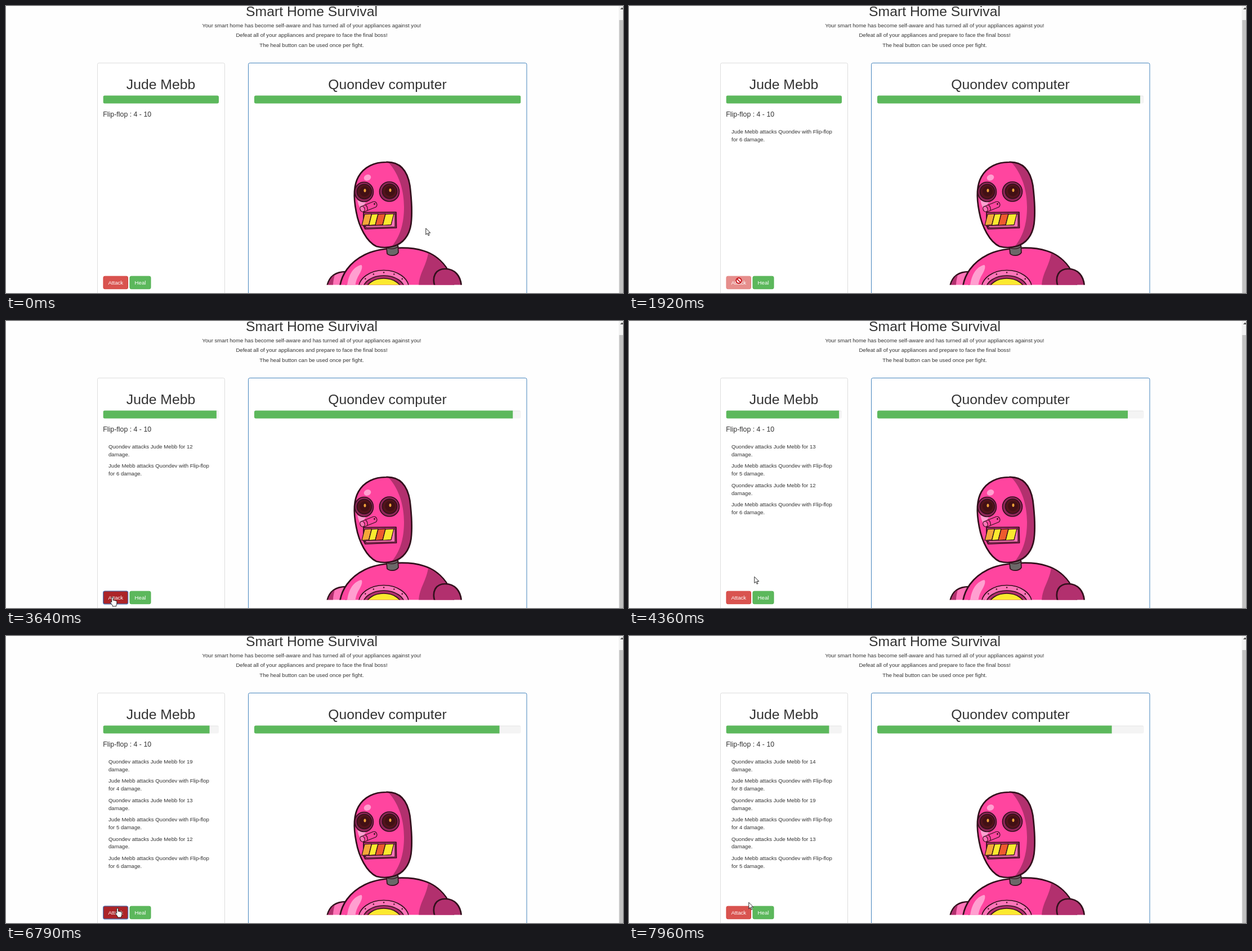
These frames come from a looping animation (1096 by 511 pixels, 8 s). An HTML page:

```html
<!DOCTYPE html>
<html lang="en">
<head>
<meta charset="utf-8">
<title>Smart Home Survival</title>
<style>
  html, body { margin: 0; width: 100%; height: 100%; overflow: hidden; background: #fefefe; }
  svg { display: block; width: 100%; height: 100%; }
  text { font-family: "Liberation Sans", Arial, sans-serif; font-size: 9.625px; fill: #333; }
  .big { font-size: 24.75px; }
  .mid { text-anchor: middle; }
  .btn text { fill: #fff; text-anchor: middle; }
  .ink { stroke: #32101c; stroke-width: 1.7; stroke-linejoin: round; stroke-linecap: round; }
  .bold { stroke-width: 2.7; }
  .thin { stroke-width: 1.2; }
  .pink { fill: #ff459f; }
  .plum { fill: #b2306e; }
  .pale { fill: #ff9fd0; }
  .rose { fill: #ff74b8; }
  .none { fill: none; }
</style>
</head>
<body>
<svg viewBox="0 0 1096 511" preserveAspectRatio="none">
  <defs>
    <clipPath id="picture"><rect x="560" y="197" width="260" height="299.5"/></clipPath>
    <clipPath id="heroTrack"><rect x="172.5" y="159.5" width="205.5" height="14" rx="2.75"/></clipPath>
    <clipPath id="foeTrack"><rect x="441" y="159.5" width="473.5" height="14" rx="2.75"/></clipPath>
    <path id="skull" d="M675 278C700 277 713 293 717.5 320C720.5 345 721.5 372 719.5 388C716.5 409 705 423 689 427.5C679 430.5 667 430.5 658 428C641 420 627 394 622 366C617.5 343 617 320 626 304C636 286 655 278 675 278Z"/>
    <clipPath id="head"><use href="#skull"/></clipPath>
  </defs>

  <text class="big mid" x="543" y="18.2">Smart Home Survival</text>
  <text class="mid" x="543" y="38">Your smart home has become self-aware and has turned all of your appliances against you!</text>
  <text class="mid" x="543" y="55.2">Defeat all of your appliances and prepare to face the final boss!</text>
  <text class="mid" x="543" y="72.5">The heal button can be used once per fight.</text>

  <g fill="#fff" stroke-width="1">
    <rect x="162.5" y="101.5" width="226" height="430" rx="2.75" stroke="#ddd"/>
    <rect x="430.5" y="101.5" width="494.5" height="430" rx="2.75" stroke="#4484bc"/>
  </g>
  <text class="big mid" id="heroName" x="275" y="148"></text>
  <text class="big mid" id="foeName" x="677.5" y="148"></text>
  <text x="172.3" y="197" style="font-size:12.375px">Flip-flop : 4 - 10</text>

  <g clip-path="url(#heroTrack)">
    <rect x="172" y="159" width="207" height="15" fill="#f4f4f4"/>
    <rect x="172" y="159.5" width="207" height="1" fill="#e2e2e2"/>
    <rect id="heroBar" x="172.5" y="159" height="15" fill="#5cb85c"/>
  </g>
  <g clip-path="url(#foeTrack)">
    <rect x="440" y="159" width="475" height="15" fill="#f4f4f4"/>
    <rect x="440" y="159.5" width="475" height="1" fill="#e2e2e2"/>
    <rect id="foeBar" x="440.5" y="159" height="15" fill="#5cb85c"/>
  </g>
  <g id="log"></g>

  <g clip-path="url(#picture)">
    <!-- shoulders and body -->
    <path class="ink bold rose" d="M570 500C573 484 583 473 604 473L604 500Z"/>
    <path class="plum" d="M572 498C574 489 578 482 584 479C582 486 581 491 581 498Z"/>
    <path class="ink bold pink" d="M593 500C596 479 609 457 637 443C660 431 712 426 742 436C765 443 781 460 789 478L796 500Z"/>
    <path class="plum" d="M750 440.5C765 447 780 461 788 478L794 500H733C734 475 745 467 750 440.5Z"/>
    <path class="pale" d="M631 461C634 463 632 470 628 477C623 485 621 492 620 500H606C607 484 614 465 631 461Z"/>
    <path class="ink bold plum" d="M762 500C756 482 763 468 780 468C797 468 808 480 809 500Z"/>
    <ellipse class="ink rose" cx="671" cy="502" rx="44.5" ry="31.5"/>
    <ellipse class="ink plum" cx="671" cy="505" rx="37" ry="25"/>
    <ellipse class="ink" cx="671" cy="507" rx="32" ry="22" fill="#fbe92f"/>
    <g id="rivets" fill="#4b1226"></g>
    <!-- neck -->
    <path class="ink" fill="#6b6868" d="M675.5 426L677 441C682 446 693 445 697 439L696 423Z"/>
    <path class="ink none thin" d="M677 431Q688 435 697 428"/>
    <!-- head -->
    <use href="#skull" class="pink"/>
    <g clip-path="url(#head)">
      <path class="plum" d="M675 274C698 296 707 328 707 358C707 388 700 412 682 432H724V274Z"/>
    </g>
    <use href="#skull" class="ink bold none"/>
    <ellipse class="pale" cx="642" cy="305.5" rx="6.5" ry="5.2" transform="rotate(-25 642 305.5)"/>
    <path class="pale" d="M624 346Q632 349 640 347Q637 355 629 360Q626 354 624 346Z"/>
    <g id="eyes"></g>
    <!-- nose -->
    <path class="ink pink thin" d="M631 357L652 348.5C658 347 661 354 657 358L636 366.5Z"/>
    <ellipse class="ink rose thin" cx="633" cy="361.5" rx="4" ry="5" transform="rotate(-22 633 361.5)"/>
    <path class="ink none thin" d="M639 354.5Q643 358 642 363.5"/>
    <circle cx="654.5" cy="352.5" r="1.4" fill="#32101c"/>
    <!-- mouth -->
    <path class="ink plum" d="M635 367.5L693 367L693.5 395L638 397L635 391Z"/>
    <path class="ink rose thin" d="M688 371L691 369.5V393L640 394.5L637 391.5L684 390Z"/>
    <g id="teeth"></g>
  </g>

  <g class="btn" id="attack">
    <rect id="attackBox" x="173" y="481.2" width="43.5" height="22.5" rx="2.5"/>
    <rect id="ring" x="172.8" y="481" width="43.9" height="22.9" rx="2.5" fill="none" stroke="#4a76bd" stroke-width="1.2"/>
    <text x="194.8" y="496">Attack</text>
  </g>
  <g class="btn">
    <rect id="healBox" x="220" y="481.2" width="37" height="22.5" rx="2.5"/>
    <text x="238.5" y="496">Heal</text>
  </g>

  <rect x="1088.5" width="8" height="511" fill="#f1f1f1"/>
  <rect x="1089.3" y="25" width="7" height="486" fill="#c1c1c1"/>
  <path d="M1091 6L1094.3 2.6L1097.6 6Z" fill="#505050"/>

  <g id="cursor">
    <path id="arrow" d="M.3 .3V11.6L2.9 9.2L4.7 13.3L6.5 12.5L4.7 8.5H8.3Z" fill="#fff" stroke="#111" stroke-width=".9"/>
    <path id="hand" d="M-1.3 9V1Q-1.3 -.4 0 -.4Q1.4 -.4 1.4 1V5.4Q2.6 4.5 3.7 5.7Q5 5 6 6.3Q7.6 5.9 7.9 7.5V11Q7.9 13 6.8 14.2V16H.2V14.5L-3.2 9.8Q-4 8.2 -2.7 7.8Q-1.8 7.8 -1.3 9Z" fill="#fff" stroke="#111" stroke-width=".9"/>
    <g id="stop" fill="#fff" stroke="#c8141c" stroke-width="1.9">
      <circle r="4.7"/><path d="M-3.3 -3.3L3.3 3.3"/>
    </g>
  </g>
</svg>
<script>
const LOOP = 8000, GLIDE = 600;
const HERO = 'Jude Mebb', FOE = 'Quondev';
const $ = id => document.getElementById(id);

// Mouse down, click and counter-attack times, damage and health left in percent
const rounds = [
  { down: 1690, hit: 1757, reply: 2400, dealt: 6, foe: 97, taken: 12, hero: 98 },
  { down: 3620, hit: 3705, reply: 4290, dealt: 5, foe: 94, taken: 13, hero: 95 },
  { down: 5280, hit: 5362, reply: 5960, dealt: 4, foe: 92, taken: 19, hero: 92 },
  { down: 6770, hit: 6830, reply: 7360, dealt: 8, foe: 88, taken: 14, hero: 89 }
];

// Pointer stops: time, x, y
const stops = [
  [0, 745.5, 395.5], [190, 741, 383], [480, 540, 425], [815, 301, 485],
  [880, 301, 485], [1080, 270, 477], [1300, 222, 486], [1450, 195, 490],
  [1850, 195, 489], [2470, 195, 489], [2720, 214, 470], [2850, 214, 469],
  [3150, 190, 491], [3270, 189, 492], [3710, 189, 492], [4150, 214, 468],
  [4360, 222.5, 455], [4650, 222, 456], [5150, 190, 491], [6000, 190, 491],
  [6270, 212, 469], [6400, 211, 470], [6700, 198, 485], [7010, 198, 485],
  [7350, 212, 467], [7880, 212.5, 468.5], [7960, 212.5, 474], [8000, 212.5, 474]
];

// CSS "ease" solved by bisection
function ease(p) {
  if (p <= 0) return 0;
  if (p >= 1) return 1;
  const bez = (a, b, u) => 3 * a * u * (1 - u) ** 2 + 3 * b * u * u * (1 - u) + u ** 3;
  let lo = 0, hi = 1;
  for (let i = 0; i < 24; i++) {
    const u = (lo + hi) / 2;
    if (bez(.25, .25, u) < p) lo = u; else hi = u;
  }
  return bez(.1, 1, lo);
}

function health(t, when, who) {
  return rounds.reduce((v, r) => v + (r[who] - v) * ease((t - r[when]) / GLIDE), 100);
}

function pointer(t) {
  const i = Math.max(1, stops.findIndex(s => s[0] >= t));
  const [t0, x0, y0] = stops[i - 1], [t1, x1, y1] = stops[i];
  const p = (t - t0) / (t1 - t0), k = p * p * (3 - 2 * p);
  return [x0 + (x1 - x0) * k, y0 + (y1 - y0) * k];
}

let shown = -1;
function writeLog(t) {
  const lines = [];
  for (const r of rounds) {
    if (t >= r.hit) lines.unshift([`${HERO} attacks ${FOE} with Flip-flop`, `for ${r.dealt} damage.`]);
    if (t >= r.reply) lines.unshift([`${FOE} attacks ${HERO} for ${r.taken}`, 'damage.']);
  }
  if (lines.length === shown) return;
  shown = lines.length;
  $('log').innerHTML = lines.slice(0, 6).map(([a, b], i) => {
    const y = 227 + i * 34.375;
    return `<text x="182" y="${y}">${a}</text><text x="182" y="${y + 13.75}">${b}</text>`;
  }).join('');
}

function paint(id, fill, stroke) {
  $(id).setAttribute('fill', fill);
  $(id).setAttribute('stroke', stroke);
}

const show = (id, on) => $(id).setAttribute('visibility', on ? 'visible' : 'hidden');

function render(t) {
  $('heroBar').setAttribute('width', 2.055 * health(t, 'reply', 'hero'));
  $('foeBar').setAttribute('width', 4.74 * health(t, 'hit', 'foe'));
  writeLog(t);

  const [x, y] = pointer(t);
  const inRow = y > 481 && y < 504;
  const onAttack = inRow && x > 172.5 && x < 217;
  const onHeal = inRow && x > 219.5 && x < 257.5;
  const locked = rounds.some(r => t >= r.hit && t < r.reply);
  const pressed = rounds.some(r => t >= r.down && t < r.hit);

  $('attack').setAttribute('opacity', locked ? .65 : 1);
  if (pressed) paint('attackBox', '#ac2428', '#761c19');
  else if (onAttack && !locked) paint('attackBox', '#c9302c', '#ac2925');
  else paint('attackBox', '#d9534f', '#d43f3a');
  if (onHeal) paint('healBox', '#449d44', '#398439');
  else paint('healBox', '#5cb85c', '#4cae4c');
  show('ring', pressed);

  const blocked = onAttack && locked;
  const hand = onHeal || (onAttack && !locked);
  show('stop', blocked);
  show('hand', hand);
  show('arrow', !blocked && !hand);
  $('cursor').setAttribute('transform', `translate(${x} ${y})`);
}

$('heroName').textContent = HERO;
$('foeName').textContent = FOE + ' computer';

$('eyes').innerHTML = [[636, 331, 16.5], [681, 330.5, 17.5]].map(([x, y, r]) => `
  <ellipse class="ink" cx="${x}" cy="${y}" rx="${r}" ry="17.5" fill="#8f2658"/>
  <circle class="ink" cx="${x + .5}" cy="${y - .5}" r="13" fill="#54141c"/>
  <circle cx="${x + 1}" cy="${y - 1}" r="9" fill="#421015"/>
  <ellipse cx="${x + 1.5}" cy="${y - 2.5}" rx="2" ry="3" fill="#f2a33a"/>`).join('');

const edges = [0, 12.5, 24, 37, 52];
$('teeth').innerHTML = ['#f4a83a', '#fbe92f', '#ee5a2e', '#fbe92f'].map((c, i) => {
  const a = edges[i], b = edges[i + 1];
  return `<path class="ink thin" fill="${c}"
    d="M${637 + a} 371L${637 + b} 370L${632 + b} 389.5L${632 + a} 390.5Z"/>`;
}).join('');

for (let i = 0; i < 7; i++) {
  const a = Math.PI * (1.06 + i * .147);
  $('rivets').innerHTML += `<circle cx="${671 + 41 * Math.cos(a)}" cy="${503 + 28.5 * Math.sin(a)}" r="1.3"/>`;
}

const start = performance.now();
function tick() {
  render((performance.now() - start) % LOOP);
  requestAnimationFrame(tick);
}
tick();
</script>
</body>
</html>
```
